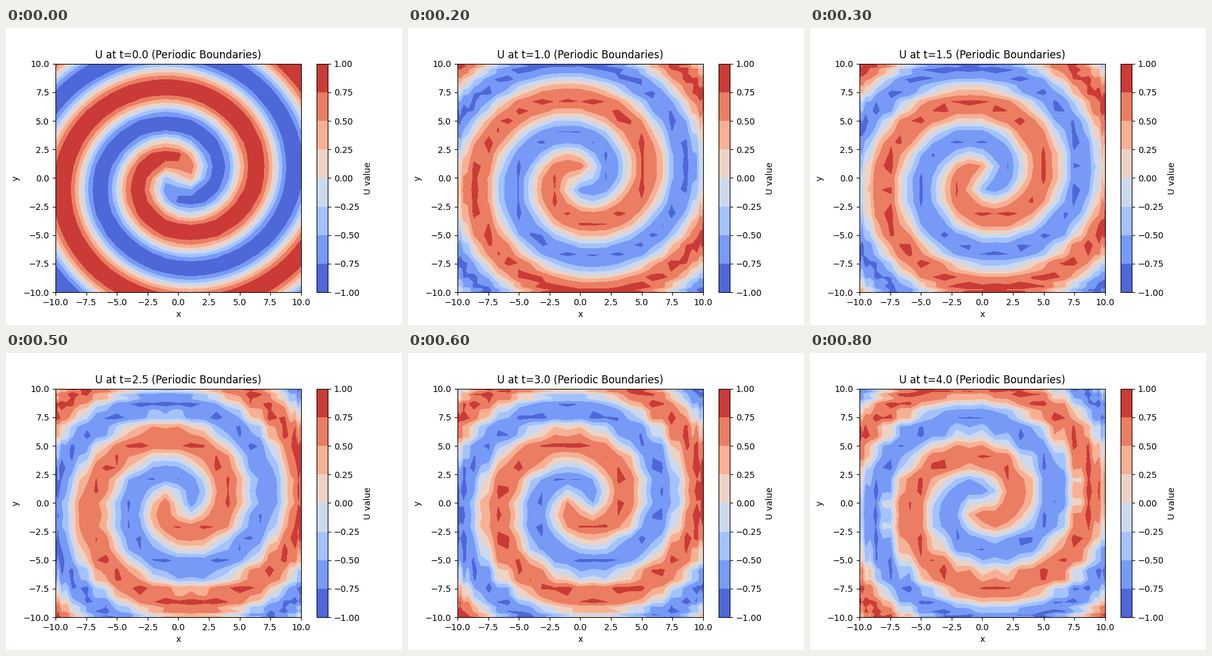
Animation, 640 px wide and 480 px high, one loop 900 ms. Source, as a matplotlib script:

```python
import numpy as np
import matplotlib.pyplot as plt
from matplotlib.animation import FuncAnimation

N = 30          # Chebyshev order
HALF = 10.0     # half width of the square domain
BETA = 1.0
DIFF = 0.1
DT_OUT = 0.5
FRAMES = 9
SUBSTEPS = 200


def cheb(n):
    """Chebyshev differentiation matrix and nodes on [-1, 1]."""
    k = np.arange(n + 1)
    x = np.cos(np.pi * k / n)
    c = (-1.0) ** k
    c[[0, -1]] *= 2
    d = np.outer(c, 1 / c) / (x[:, None] - x[None, :] + np.eye(n + 1))
    return d - np.diag(d.sum(axis=1)), x


D, nodes = cheb(N)
D[[0, -1], :] = 0           # no flux through the walls
D2 = D @ D / HALF**2
X, Y = np.meshgrid(HALF * nodes, HALF * nodes)


def rate(z):
    """Lambda-omega reaction plus diffusion for z = u + iv."""
    a2 = np.abs(z) ** 2
    return (1 - a2 - 1j * BETA * a2) * z + DIFF * (D2 @ z + z @ D2.T)


def rk4(z, h):
    k1 = rate(z)
    k2 = rate(z + h / 2 * k1)
    k3 = rate(z + h / 2 * k2)
    k4 = rate(z + h * k3)
    return z + h / 6 * (k1 + 2 * k2 + 2 * k3 + k4)


def solve():
    r = np.hypot(X, Y)
    z = np.tanh(r) * np.exp(1j * (np.arctan2(Y, X) - r))
    states = [z.real]
    for _ in range(FRAMES - 1):
        for _ in range(SUBSTEPS):
            z = rk4(z, DT_OUT / SUBSTEPS)
        states.append(z.real)
    return states


states = solve()
fig, ax = plt.subplots(figsize=(6.4, 4.8), dpi=100)


def draw(i):
    ax.clear()
    # the evolved field overshoots 1 a little, so its bands are wider
    top = 1.0 if i == 0 else 1.2
    u = np.clip(states[i], -0.999 * top, 0.999 * top)
    bands = ax.contourf(X, Y, u, levels=np.linspace(-top, top, 9),
                        cmap="coolwarm")
    ax.set_title(f"U at t={i * DT_OUT:.1f} (Periodic Boundaries)")
    ax.set_xlabel("x")
    ax.set_ylabel("y")
    return bands


fig.colorbar(draw(0), ax=ax, label="U value")


def update(i):
    return [draw(i)]


anim = FuncAnimation(fig, update, frames=FRAMES, interval=100,
                     init_func=lambda: [], repeat=True, repeat_delay=0,
                     blit=False)
plt.show()
```
